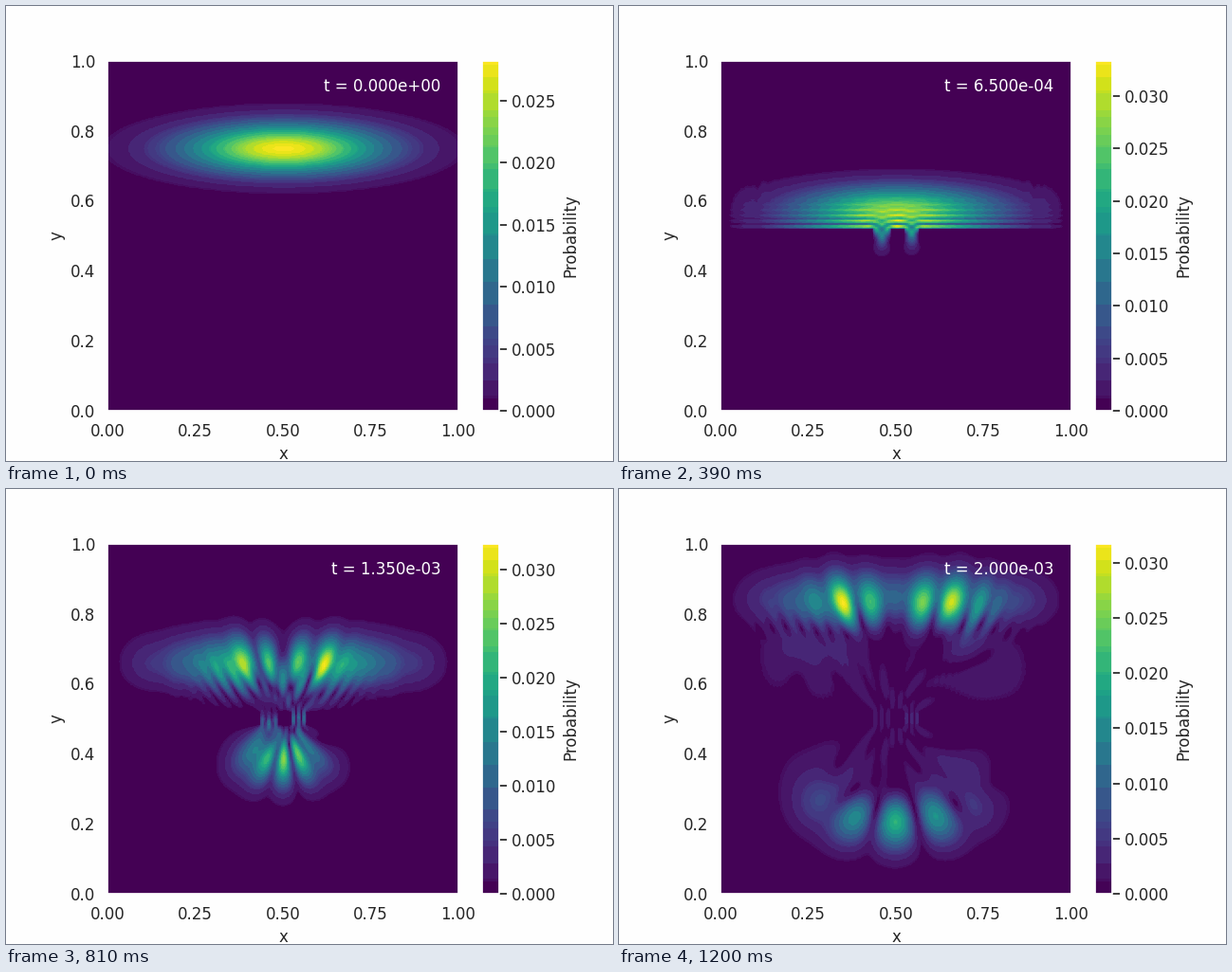
Animation, 640 px wide and 480 px high, one loop 1230 ms. Source, as a matplotlib script:

```python
import numpy as np
import matplotlib
import matplotlib.pyplot as plt
from matplotlib.animation import FuncAnimation
from matplotlib.colors import ListedColormap

WHITE, INK = "#fefefe", "0.15"
plt.rcParams.update({
    "font.family": "DejaVu Sans", "font.size": 12,
    "figure.facecolor": WHITE, "axes.edgecolor": WHITE,
    "axes.linewidth": 1.25, "axes.labelcolor": INK,
    "xtick.color": INK, "ytick.color": INK,
    "xtick.bottom": False, "ytick.left": False,
    "xtick.major.size": 6, "ytick.major.size": 6,
    "xtick.major.width": 1.25, "ytick.major.width": 1.25,
})

# Grid, time step and double-slit wall (in grid cells)
N, H, DT = 200, 0.005, 2.5e-5
FRAMES, STEPS = 41, 2
WALL_TOP, WALL_END = 96, 104
OPEN = np.r_[87:97, 105:113]
THICK = WALL_END - WALL_TOP
BOX = WALL_TOP - 1
R = 0.5j * DT / H**2


def sine_modes(n):
    """Orthonormal sine basis and eigenvalues of the 1D Laplacian."""
    k = np.arange(1, n + 1)
    basis = np.sqrt(2 / (n + 1)) * np.sin(np.pi * np.outer(k, k) / (n + 1))
    return basis, 2 - 2 * np.cos(np.pi * k / (n + 1))


SX, EX = sine_modes(N - 2)
SY, EY = sine_modes(BOX)
LAM = 1 + R * (EY[:, None] + EX)


def solve_box(rhs):
    return SY @ ((SY @ rhs @ SX) / LAM) @ SX


def neighbours(cells):
    return (abs(cells[:, None] - cells) == 1).astype(float)


def slit_inverse():
    """Inverse of the slit system with both half spaces eliminated."""
    n = len(OPEN)
    k = (1 + 4 * R) * np.eye(THICK * n) - R * (
        np.kron(np.eye(THICK), neighbours(OPEN))
        + np.kron(neighbours(np.arange(THICK)), np.eye(n)))
    modes = SX[OPEN - 1]
    edge = (modes * (SY[-1][:, None]**2 / LAM).sum(0)) @ modes.T
    k[:n, :n] -= R**2 * edge
    k[-n:, -n:] -= R**2 * edge
    return np.linalg.inv(k)


def evolve():
    """Crank-Nicolson run; returns |u| for every frame."""
    row, col = np.mgrid[:N, :N] * H
    u = np.exp(-(row - 0.25)**2 / (2 * 0.05**2)
               - (col - 0.5)**2 / (2 * 0.2**2) + 200j * row)
    u /= np.linalg.norm(u)
    shots = [abs(u)]
    inv = slit_inverse()
    cols = OPEN - 1
    boxes = np.stack([u[1:WALL_TOP, 1:-1], u[WALL_END:-1, 1:-1]])
    slit = u[WALL_TOP:WALL_END, OPEN]

    for step in range(1, STEPS * (FRAMES - 1) + 1):
        free = solve_box(boxes)
        rhs = slit.copy()
        rhs[0] += R * free[0, -1, cols]
        rhs[-1] += R * free[1, 0, cols]
        mid = (inv @ rhs.ravel()).reshape(slit.shape)
        rhs = boxes.copy()
        rhs[0, -1, cols] += R * mid[0]
        rhs[1, 0, cols] += R * mid[-1]
        boxes = 2 * solve_box(rhs) - boxes
        slit = 2 * mid - slit
        if step % STEPS == 0:
            z = np.zeros((N, N))
            z[1:WALL_TOP, 1:-1] = abs(boxes[0])
            z[WALL_END:-1, 1:-1] = abs(boxes[1])
            z[WALL_TOP:WALL_END, OPEN] = abs(slit)
            shots.append(z)
    return shots


# Viridis in flat bands: shades sharing coarse RGB bits get one mean colour
SHADES = matplotlib.colormaps["viridis"](np.arange(256), bytes=True)[:, :3]
CODE = (SHADES >> np.array([5, 4, 5], np.uint8)).astype(int) @ [256, 16, 1]
BAND = np.unique(CODE, return_inverse=True)[1]


def banded(z):
    level = np.minimum(z / z.max() * 256, 255).astype(int)
    weight = 24 + 3.4 * np.bincount(level.ravel(), minlength=256)
    total = np.bincount(BAND, weight)
    mean = [np.bincount(BAND, weight * c) / total for c in SHADES.T]
    return ListedColormap(np.floor(np.stack(mean, 1))[BAND] / 255)


shots = evolve()
fig, ax = plt.subplots(figsize=(6.4, 4.8), dpi=100)
img = ax.imshow(shots[0], extent=(0, 1, 0, 1), cmap=banded(shots[0]),
                vmin=0, vmax=shots[0].max())
ax.set(xlabel="x", ylabel="y",
       xticks=np.linspace(0, 1, 5), yticks=np.linspace(0, 1, 6))
bar = fig.colorbar(img, ax=ax)
bar.set_label("Probability")
clock = ax.text(0.95, 0.95, "", color=WHITE, ha="right", va="top")


def draw(i):
    z = shots[i]
    img.set_data(z)
    img.set_clim(0, z.max())
    img.set_cmap(banded(z))
    clock.set_text(f"t = {i * STEPS * DT:.3e}")
    return img, clock


anim = FuncAnimation(fig, draw, frames=FRAMES, interval=30,
                     repeat=True, repeat_delay=0, blit=False)
plt.show()
```
